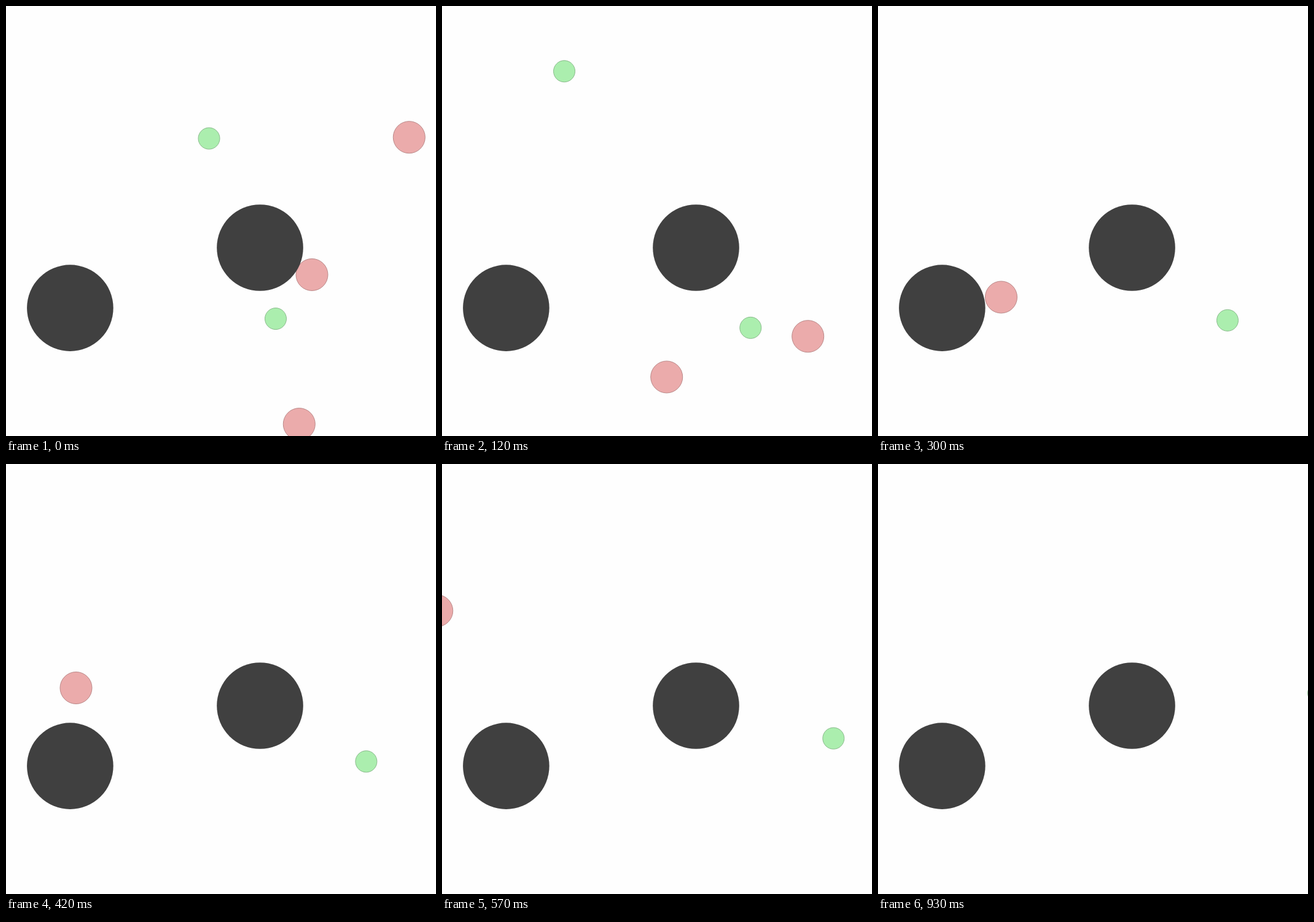
Recreate the animation shown at these times as an HTML page with a canvas. Size 700x700 px, loop 1530 ms.

```html
<!DOCTYPE html>
<html>
<head>
<meta charset="utf-8">
<style>
  html, body { margin: 0; width: 100%; height: 100%; overflow: hidden; background: #fefefe; }
  canvas { display: block; }
</style>
</head>
<body>
<canvas id="stage" width="700" height="700"></canvas>
<script>
const ctx = document.getElementById('stage').getContext('2d');
const LOOP = 1530, STEP = 30, END = 930;

const dark = { r: 70.3, fill: '#404040' };
const red = { r: 26, fill: '#ebabab', line: '#bb8989' };
const green = { r: 17.5, fill: '#abeeae', line: '#8abb8c' };

const still = (x, y) => () => [x, y];

// Speeds in pixels per ms, a constant sideways drift in pixels per ms squared
const launch = (x, y, vx, vy, ax = 0, ay = 0) => t =>
  [x + (vx + ax * t) * t, y + (vy + ay * t) * t];

// Smooth curve through [time, x, y] points
const curve = (...keys) => t => {
  const last = keys.length - 1;
  const slope = (i, k) => (keys[i + 1][k] - keys[i][k]) / (keys[i + 1][0] - keys[i][0]);
  const tangent = (i, k) => {
    if (i === 0) return slope(0, k);
    if (i === last) return slope(last - 1, k);
    const before = keys[i][0] - keys[i - 1][0], after = keys[i + 1][0] - keys[i][0];
    return (after * slope(i - 1, k) + before * slope(i, k)) / (before + after);
  };
  let i = 0;
  while (i < last - 1 && t >= keys[i + 1][0]) i++;
  const a = keys[i], b = keys[i + 1], span = b[0] - a[0];
  const u = Math.min(1, (t - a[0]) / span), v = 1 - u;
  return [1, 2].map(k => v * v * (1 + 2 * u) * a[k] + u * u * (1 + 2 * v) * b[k]
    + span * u * v * (v * tangent(i, k) - u * tangent(i + 1, k)));
};

const discs = [
  { ...red, at: launch(656.3, 213.7, 0.6, 0.358) },
  { ...red, at: launch(498, 437.4, 0.814, 0.836) },
  { ...red, at: curve([0, 477.3, 680.6], [60, 423.6, 642.2], [180, 307.5, 564],
                      [300, 200.5, 474], [420, 114, 364.5], [600, -33, 214]) },
  { ...green, at: launch(330.5, 215.6, -0.955, -0.946, -0.00117, 0.00029) },
  { ...green, at: curve([0, 439, 509.1], [60, 461.2, 515.1], [180, 542.7, 529], [300, 569, 511.7],
                        [420, 586.4, 484.3], [570, 637.3, 446.6], [930, 717, 373]) },
  { ...dark, at: still(104.4, 491.6) },
  { ...dark, at: still(413.5, 393.5) }
];

function disc({ r, fill, line, at }, t) {
  ctx.beginPath();
  ctx.arc(...at(t), r, 0, 2 * Math.PI);
  ctx.fillStyle = fill;
  ctx.fill();
  if (line) {
    ctx.strokeStyle = line;
    ctx.stroke();
  }
}

function draw(now) {
  const t = Math.min(END, Math.floor((now % LOOP) / STEP) * STEP);
  ctx.fillStyle = '#fefefe';
  ctx.fillRect(0, 0, 700, 700);
  for (const d of discs) disc(d, t);
}

let start;
function tick(now) {
  start ??= now;
  draw(now - start);
  requestAnimationFrame(tick);
}
draw(0);
requestAnimationFrame(tick);
</script>
</body>
</html>
```
